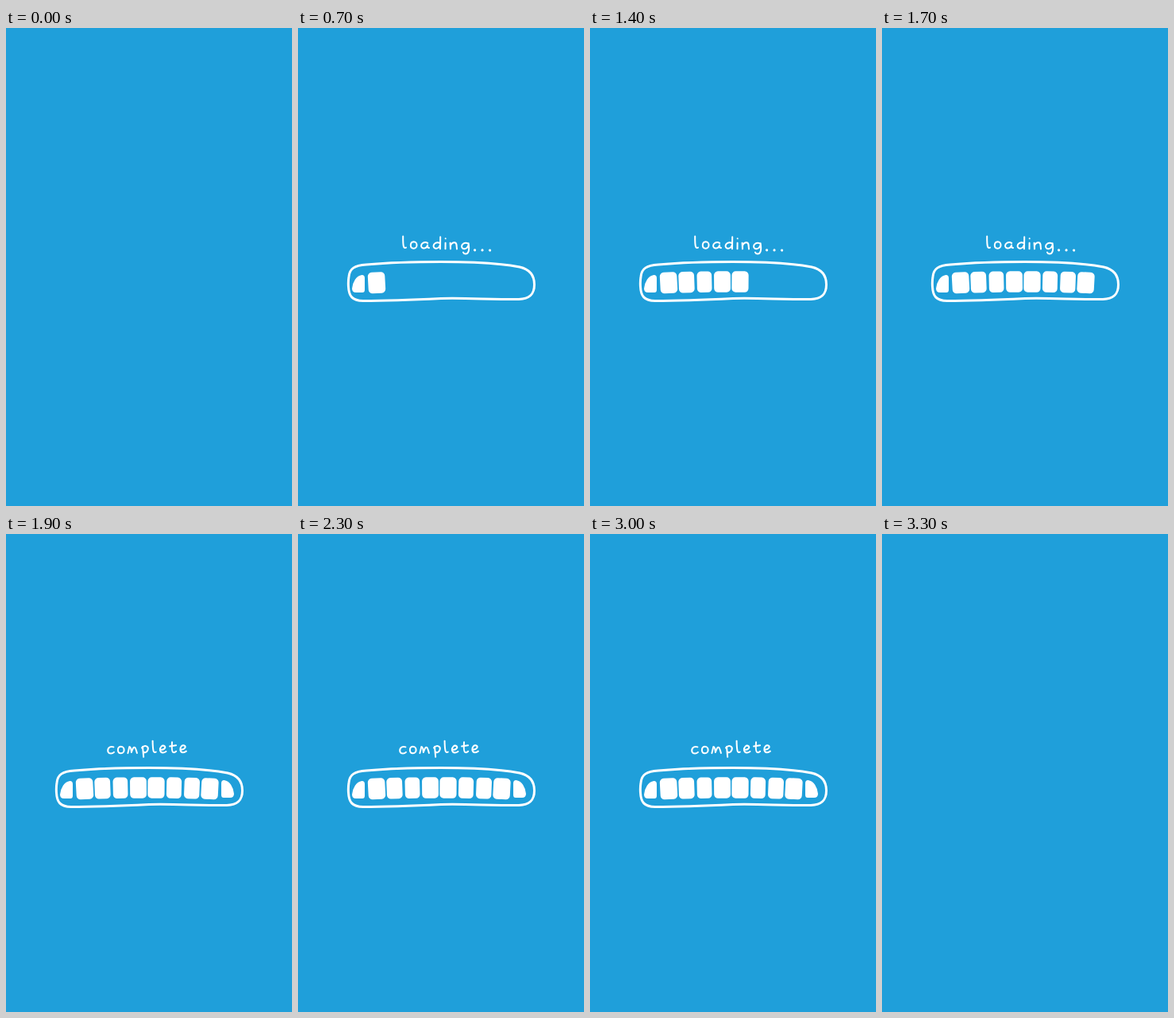
Recreate the animation shown at these times as an HTML page. Size 360x600 px, loop 3500 ms.

```html
<!DOCTYPE html>
<html lang="en">
<head>
<meta charset="utf-8">
<title>Loading bar</title>
<style>
  html, body { margin: 0; width: 100%; height: 100%; overflow: hidden; background: #1f9fda; }
  svg { display: block; width: 360px; height: 600px; }
  path { fill: none; stroke: #fff; stroke-width: 2; stroke-linecap: round; stroke-linejoin: round; }
  #bar { stroke-width: 3; }
  #blocks * { fill: #fff; }
</style>
</head>
<body>
<svg viewBox="0 0 360 600">
  <g id="scene">
    <g id="loading" role="img" aria-label="loading..." transform="translate(131 276.500) rotate(.8)"></g>
    <g id="complete" role="img" aria-label="complete" transform="translate(128 275.500) rotate(-.8)"></g>
    <path id="bar" d="M64 312C65 302 71 298 86 297C120 294 150 293.500 180 293.500
      C225 293.500 258 296 279 300C292 303 297.500 311 297.500 322C297.500 335 291 340 278 340.500
      C245 341 210 338.500 180 339.500C150 341 112 342.500 82 342.500C68 342.500 64 336 63.500 325Q63 318 64 312Z"/>
    <g id="blocks"></g>
  </g>
</svg>
<script>
  const $ = id => document.getElementById(id);

  // Handwritten letters on a baseline at y = 0: [width, strokes]
  const bowl = "M8-7C4-9.5 0-6 0-3.5C0 1 7 .5 8-4.5";
  const glyphs = {
    a: [10, bowl + "V-3Q8-1 10-1"],
    c: [8, "M7.5-8C2-10-.5-5.5 .5-2C2 1 6 .5 8-1.5"],
    d: [9, bowl + "M8.5-15V0"],
    e: [8, "M1-4C4-3 8-5.500 6.500-8C3.500-10.500 0-7 .5-3C1.500 1 5.500 .5 8-1.500"],
    g: [10, bowl + "M8.500-7.500C10 1 9 6 5 6Q3 6 2 4"],
    i: [1, "M.5-7.500V0M.5-13v.1"],
    l: [5, "M1-15Q1-5 2-2Q3 0 5-1"],
    m: [12, "M0 0L2-8Q4-8 4.500-1Q7-9 9-7Q10-6 11.500 0"],
    n: [9, "M0-7.500L.5 0V-4.500C3-9.500 8-9 8-4.500L8.500 0"],
    o: [8, "M4-8.500C-1-8-1 0 4 0C9.300 0 9.300-8.500 4-8.500"],
    p: [9, "M2-8L3 5M1-6.500C5-11 10-8 8.500-4C7 0 4 0 3-1.500"],
    t: [8, "M3-13Q2-2 4-.5Q6 .5 8-1.500M0-8L8-9"],
    ".": [4, "M1 .4a.6 .6 0 1 0 .1 0"]
  };

  function write(word, gap) {
    let x = 0;
    $(word.replaceAll(".", "")).innerHTML = [...word].map(letter => {
      const [width, strokes] = glyphs[letter];
      const path = `<path d="${strokes}" transform="translate(${x})"/>`;
      x += width + gap;
      return path;
    }).join("");
  }
  write("loading...", 5.5);
  write("complete", 4.7);

  // Eight rounded blocks fan out slightly between two mirrored end caps
  const count = 10;
  function blockShape(i) {
    if (i === 0 || i === count - 1) {
      const place = i ? "translate(355 -1) scale(-1 1)" : "";
      return `<path d="M80.500 311C74 312 70 319 69 327Q69 331 73 331H81Q83 331 83 328.500V314Q83 311 80.500 311Z" transform="${place}"/>`;
    }
    const k = i - 1, side = k - 3.5;
    const x = 99 + 22.5 * k, y = 318.5 + 0.1 * side * side;
    const width = 20 + 1.5 * Math.cos(1.75 * k), height = 26.5;
    return `<rect x="${x - width / 2}" y="${y - height / 2}" width="${width}" height="${height}"
      rx="5" transform="rotate(${0.9 * side} ${x} ${y})"/>`;
  }
  $("blocks").innerHTML = Array.from({ length: count }, (_, i) => blockShape(i)).join("");
  const blocks = [...$("blocks").children];

  const loop = 3500, start = 300, done = 1900, end = 3300;
  const show = (el, on) => el.setAttribute("display", on ? "inline" : "none");

  // One block each 200 ms at first, then one each 100 ms
  const blockTime = i => 500 + 200 * Math.min(i, 4) + 100 * Math.max(i - 4, 0);

  function draw(now) {
    const t = now % loop;
    show($("scene"), t >= start && t < end);
    show($("loading"), t < done);
    show($("complete"), t >= done);
    blocks.forEach((block, i) => show(block, t >= blockTime(i)));
  }

  const origin = performance.now();
  function tick() {
    draw(performance.now() - origin);
    requestAnimationFrame(tick);
  }
  tick();
</script>
</body>
</html>
```
